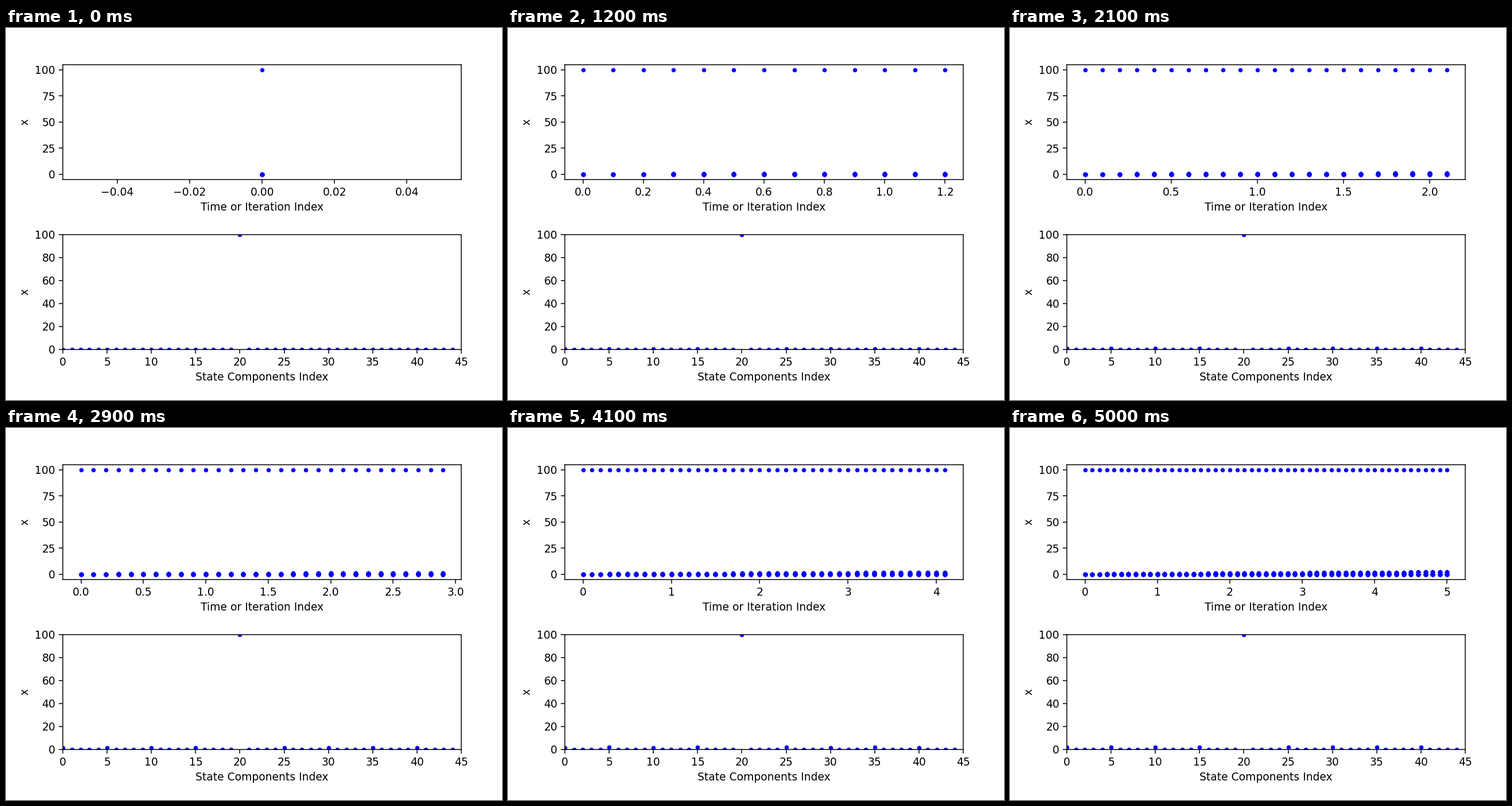
These frames come from a looping animation (864 px wide and 648 px high, 5.1 s). A matplotlib script:

```python
import numpy as np
import matplotlib.pyplot as plt
from matplotlib.animation import FuncAnimation

FRAMES = 51
STEP = 0.1          # time between states
ZONES = 9           # 3 x 3 grid of zones
PER_ZONE = 5        # state components per zone
HOT_ZONE = 4        # centre zone, held at 100


def state(t):
    """All state components at time t."""
    x = np.zeros(ZONES * PER_ZONE)
    for zone in range(ZONES):
        beside_hot = zone % 2 == 1
        gain = 0.005 if beside_hot else 0.0025
        x[zone * PER_ZONE] = 0.368 * t + gain * t * t
    x[HOT_ZONE * PER_ZONE] = 100
    return x


times = np.arange(FRAMES) * STEP
states = np.array([state(t) for t in times])
index = np.arange(ZONES * PER_ZONE)

fig, (ax_time, ax_state) = plt.subplots(2, 1, figsize=(6.4, 4.8), dpi=135)
fig.tight_layout(pad=3.0)

history, = ax_time.plot([], [], "b.")
ax_time.set_ylim(-5, 105)
ax_time.set_xlabel("Time or Iteration Index")
ax_time.set_ylabel("x")

current, = ax_state.plot([], [], "b.")
ax_state.set_xlim(0, index.size)
ax_state.set_ylim(0, 100)
ax_state.set_xlabel("State Components Index")
ax_state.set_ylabel("x")


def update(i):
    n = i + 1
    history.set_data(np.repeat(times[:n], index.size), states[:n].ravel())
    if i == 0:
        ax_time.set_xlim(-0.055, 0.055)
    else:
        margin = 0.05 * times[i]
        ax_time.set_xlim(-margin, times[i] + margin)
    current.set_data(index, states[i])
    return history, current


anim = FuncAnimation(fig, update, frames=FRAMES, interval=100,
                     init_func=lambda: update(0), repeat=True,
                     repeat_delay=0, blit=False)
plt.show()
```
